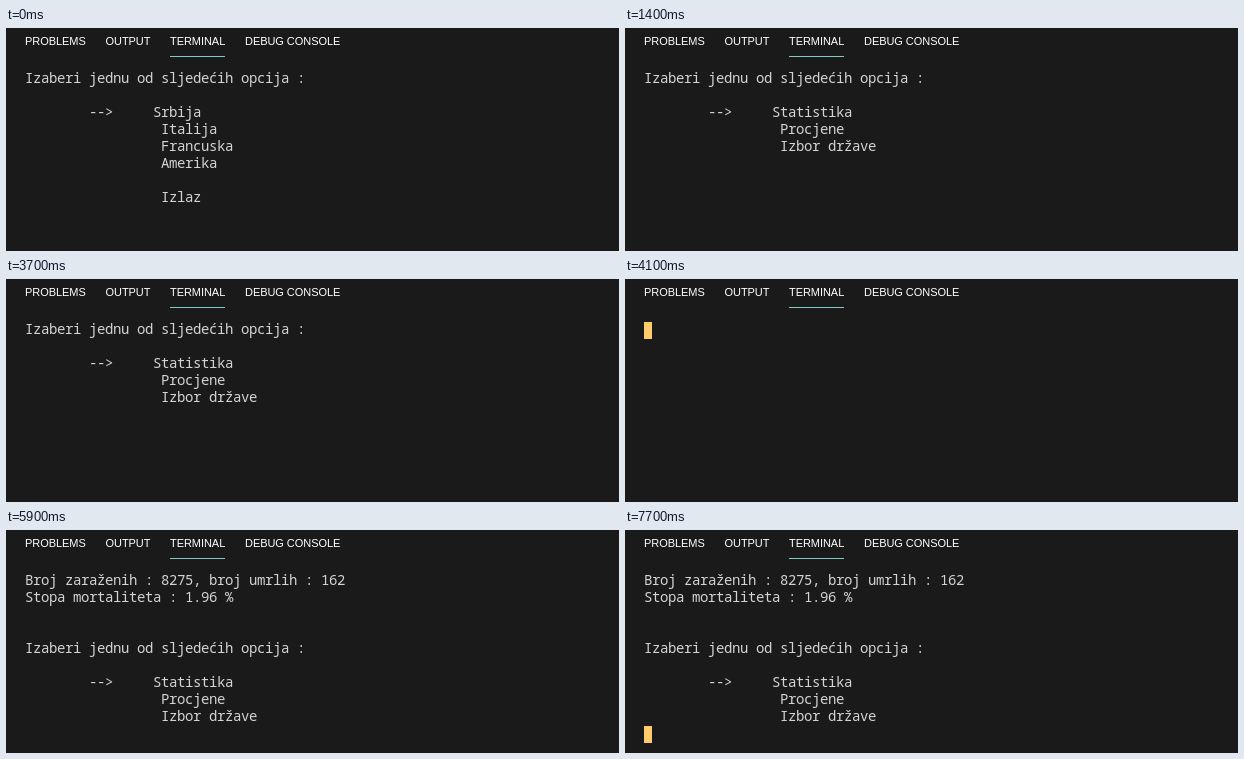
These frames come from a looping animation (613x223 px, 8000 ms). An HTML page:

```html
<!DOCTYPE html>
<html lang="sr">
<head>
<meta charset="utf-8">
<title>Terminal</title>
<style>
  html, body { margin: 0; width: 100%; height: 100%; overflow: hidden; background: #1a1a1a; }
  #stage { position: relative; width: 613px; height: 223px; overflow: hidden; background: #1a1a1a; }
  .tab {
    position: absolute; top: 7px; height: 21px; white-space: pre; letter-spacing: -0.05px;
    font: 11px/13px "Liberation Sans", Arial, sans-serif; color: #fff;
  }
  .active { width: 55px; border-bottom: 1px solid #80cbc4; }
  #screen {
    position: absolute; left: 19px; top: 41px; margin: 0; color: #d4d4d4;
    font: 500 14px/17px "Noto Sans Mono", "DejaVu Sans Mono", monospace;
    letter-spacing: -0.4px; font-variant-ligatures: none;
  }
  #cursor { position: absolute; left: 19px; width: 8px; height: 17px; background: #ffcb6b; }
</style>
</head>
<body>
<div id="stage">
  <div class="tab" style="left:19px">PROBLEMS</div>
  <div class="tab" style="left:99.5px">OUTPUT</div>
  <div class="tab active" style="left:164px">TERMINAL</div>
  <div class="tab" style="left:239px">DEBUG CONSOLE</div>
  <pre id="screen"></pre>
  <div id="cursor"></div>
</div>
<script>
const LOOP = 8000, TOP = 43, ROW = 17;
const screen = document.getElementById("screen");
const cursor = document.getElementById("cursor");

const menu = ([first, ...rest]) => [
  "Izaberi jednu od sljedećih opcija :", "",
  " ".repeat(8) + "-->" + " ".repeat(5) + first,
  ...rest.map(item => item && " ".repeat(17) + item)
];

const countries = menu(["Srbija", "Italija", "Francuska", "Amerika", "", "Izlaz"]);
const actions = menu(["Statistika", "Procjene", "Izbor države"]);
const stats = [
  "Broj zaraženih : 8275, broj umrlih : 162",
  "Stopa mortaliteta : 1.96 %", "", ""
];

// The cursor sits on the row below the text; blinks lists its on/off switches.
const scenes = [
  { at: 0, lines: countries, on: false, blinks: [600] },
  { at: 700, lines: actions, on: true, blinks: [1400, 1900, 2500, 3100, 3700] },
  { at: 4100, lines: [], on: true, blinks: [] },
  { at: 4150, lines: [...stats, ...actions], on: true, blinks: [4700, 5300, 5900, 6500, 7100, 7700] }
];

let shown = null;

function draw(t) {
  const scene = scenes.findLast(s => t >= s.at);
  if (scene !== shown) {
    screen.textContent = scene.lines.join("\n");
    cursor.style.top = TOP + scene.lines.length * ROW + "px";
    shown = scene;
  }
  const flips = scene.blinks.filter(b => t >= b).length;
  const lit = scene.on !== (flips % 2 === 1);
  cursor.style.visibility = lit ? "visible" : "hidden";
}

const start = performance.now();
function tick() {
  draw((performance.now() - start) % LOOP);
  requestAnimationFrame(tick);
}
tick();
</script>
</body>
</html>
```
